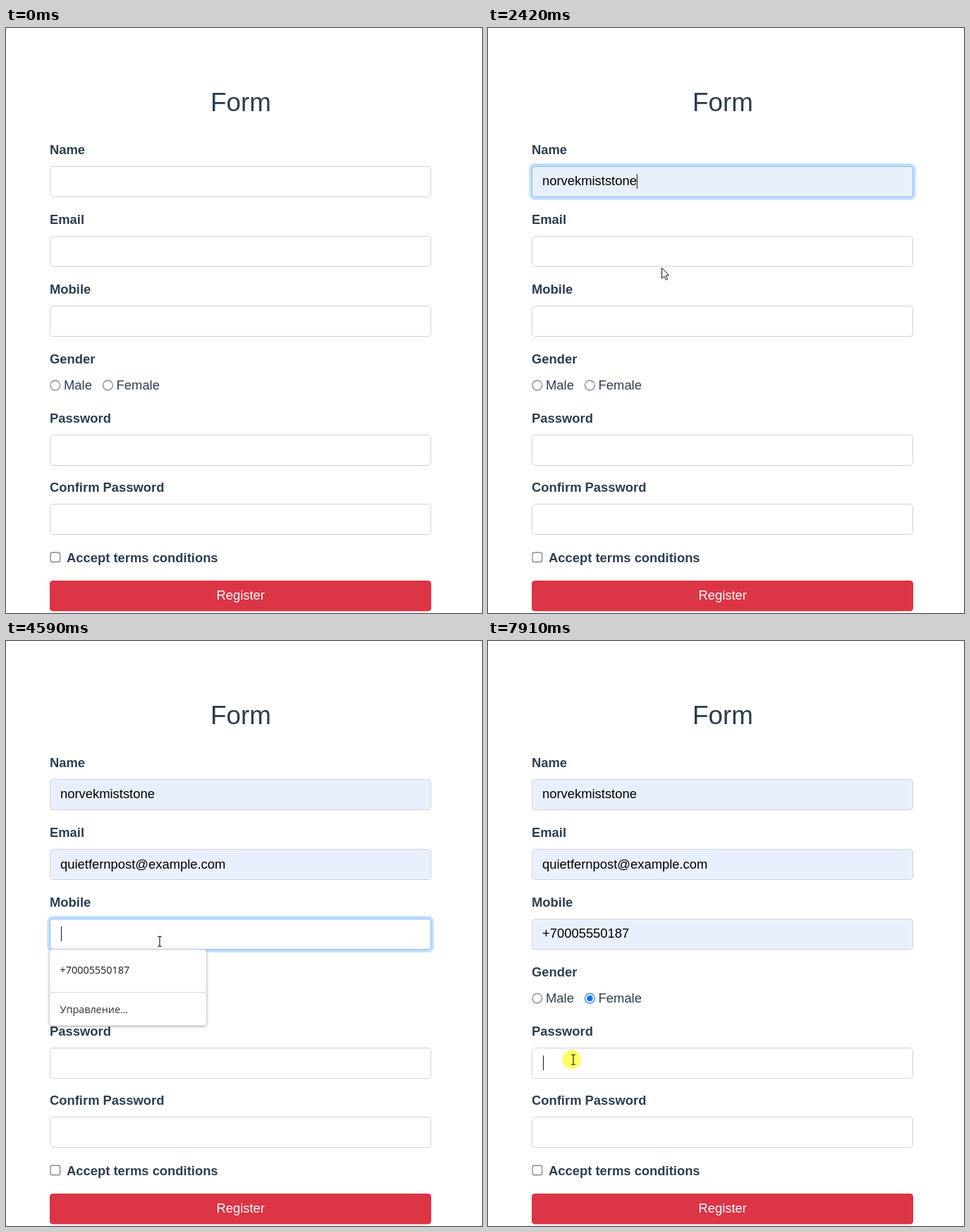
These frames come from a looping animation (675 by 830 pixels, 7990 ms). An HTML page:

```html
<!DOCTYPE html>
<html lang="en">
<head>
<meta charset="utf-8">
<title>Form</title>
<style>
  html, body { margin: 0; width: 100%; height: 100%; overflow: hidden; background: #fff; }
  svg { display: block; width: 675px; height: 830px; font: 18.4px "Liberation Sans", Arial, sans-serif; fill: #2c3e50; }
  .title { font-size: 36.8px; }
  .label { font-weight: 700; }
  .value { fill: #000; }
  .preview { fill: #000; font-size: 15.3px; }
  .item { fill: #1b1b1b; font: 500 14.4px "Open Sans", "Noto Sans", sans-serif; }
  .manage { fill: #333; font-weight: 400; }
  .menu { fill: #fff; filter: drop-shadow(0 1px 2px rgba(0, 0, 0, .4)); }
</style>
</head>
<body>
<svg id="stage" viewBox="0 0 675 830"></svg>
<script>
const LOOP = 7990, ROW = 41.35;
const USER = 'norvekmiststone', MAIL = 'quietfernpost@example.com', PHONE = '+70005550187';

// open/filled: menu opens / value is chosen; focus: [start, end] in ms
const fields = [
  { label: 'Name', y: 196, base: 223, focus: [1100, 2720], open: 1200, filled: 2190, value: USER,
    width: 222, height: 267, items: ['Ливея', USER, 'note', 'ghkk', 'id', 'alrowenmistystonefen'] },
  { label: 'Email', y: 295, base: 322.5, focus: [2720, 4120], open: 2870, filled: 3620, value: MAIL,
    width: 250, height: 267,
    items: [MAIL, MAIL, 'olvey416@example.com', 'Q' + MAIL.slice(1), '80005550142', '80005550187'] },
  { label: 'Mobile', y: 394, base: 421, focus: [4120, 5900], open: 4210, filled: 5060, value: PHONE,
    width: 222, height: 108, items: [PHONE], manage: true },
  { label: 'Password', y: 577, base: 604, focus: [7890, 9999] },
  { label: 'Confirm Password', y: 675, base: 702 }
];

// pointer path: time, x, y
const path = [
  [450, 646, 815], [650, 560, 640], [900, 380, 350], [1100, 268, 226], [1390, 262, 222],
  [1470, 258, 260], [1560, 257, 289], [1730, 257, 289], [1870, 249, 318], [2020, 247, 317],
  [2270, 247, 317], [2420, 246, 340], [2500, 246, 340], [2700, 245, 323], [2900, 242, 328],
  [3100, 240, 345], [3200, 240, 350], [3370, 240, 350], [3430, 224, 359], [3650, 224, 359],
  [3810, 222, 368], [3960, 222, 368], [4120, 218, 426], [4590, 218, 426], [4800, 212, 468],
  [5060, 210, 468], [5370, 197, 495], [5450, 150, 489], [5520, 97, 481], [5680, 72, 500],
  [5830, 74, 505], [6100, 95, 521], [6350, 116, 520], [6600, 118, 512], [6670, 98, 507],
  [6750, 77, 502], [6830, 68, 500], [7000, 68, 500], [7080, 95, 502], [7230, 150, 503],
  [7390, 150, 503], [7540, 140, 545], [7700, 124, 598], [7850, 121, 594], [LOOP, 121, 594]
];
const clicks = [[1100, 1220], [2020, 2190], [2720, 2850], [3580, 3680], [4120, 4240], [4980, 5080],
  [5830, 5950], [6820, 7040], [7200, 7420], [7870, LOOP]];

const clamp = v => Math.max(0, Math.min(1, v));
const within = (t, [a, b]) => t >= a && t < b;
const text = (x, y, s, cls = '') => `<text x="${x}" y="${y}" class="${cls}">${s}</text>`;

function pointerAt(t) {
  if (t < path[0][0]) return null;
  const i = path.findIndex(p => p[0] > t);
  const [t0, x0, y0] = path[i - 1], [t1, x1, y1] = path[i];
  const k = (t - t0) / (t1 - t0);
  return { x: x0 + (x1 - x0) * k, y: y0 + (y1 - y0) * k };
}

const isOpen = (f, t) => f.items && within(t, [f.open, f.filled]);

function hoveredRow(f, t, p) {
  if (!isOpen(f, t)) return -1;
  const row = Math.floor((p.y - f.y - 52.3) / ROW);
  return row < f.items.length ? row : -1;
}

function caretX(f) {
  const probe = document.getElementById('value' + fields.indexOf(f));
  return probe ? 77.5 + probe.getComputedTextLength() : 78.5;
}

function drawField(f, t, p) {
  const row = p ? hoveredRow(f, t, p) : -1;
  const filled = f.value && t >= f.filled;
  const [on, off] = f.focus || [1e5, 1e5];
  const glow = clamp((t - on - 90) / 150) * clamp(1 - (t - off) / 150);
  let out = text(62, f.y - 17, f.label, 'label');
  if (glow > 0) out += `<rect x="60.2" y="${f.y - 1.8}" width="544.6" height="47.6" rx="6" fill="none" stroke="#007bff" stroke-opacity="${glow * .25}" stroke-width="3.7"/>`;
  out += `<rect x="62.5" y="${f.y + .5}" width="540" height="43" rx="4.2" fill="${filled || row >= 0 ? '#e8f0fe' : '#fff'}" stroke="#ced4da"/>`;
  if (glow > 0) out += `<rect x="62.5" y="${f.y + .5}" width="540" height="43" rx="4.2" fill="none" stroke="#80bdff" stroke-opacity="${glow}"/>`;
  if (filled) out += `<text id="value${fields.indexOf(f)}" x="77" y="${f.base}" class="value">${f.value}</text>`;
  else if (row >= 0) out += text(77.5, f.base, f.items[row], 'preview');
  return out;
}

function drawCaret(f, t) {
  if (!f.focus || !within(t, f.focus)) return '';
  const since = t - (t >= f.filled ? f.filled : f.focus[0]);
  if (since > 850) return '';
  const x = t >= f.filled ? caretX(f) : 78.5;
  return `<path d="M${x} ${f.y + 11}v21" stroke="#222" stroke-width="1.1"/>`;
}

function drawMenu(f, t, p) {
  if (!isOpen(f, t)) return '';
  const top = f.y + 43.5, row = hoveredRow(f, t, p);
  let out = `<rect x="62" y="${top}" width="${f.width}" height="${f.height}" rx="4" class="menu"/>`;
  if (row >= 0) out += `<rect x="62" y="${top + 8.8 + row * ROW}" width="${f.width}" height="${ROW}" fill="#c8c8c8"/>`;
  f.items.forEach((s, i) => out += text(76.5, top + 34.3 + i * ROW, s, 'item'));
  if (f.manage) {
    out += `<path d="M62 ${top + 61}h${f.width}" stroke="#dcdcdc"/>` + text(76.5, top + 90, 'Управление…', 'item manage');
  }
  return out;
}

function radio(x, label, checked, hover) {
  const color = checked ? '#0075ff' : hover ? '#4f4f4f' : '#767676';
  return `<circle cx="${x}" cy="507" r="6.9" fill="#fff" stroke="${color}" stroke-width="1.15"/>` +
    (checked ? `<circle cx="${x}" cy="507" r="4.3" fill="${color}"/>` : '') + text(x + 12.2, 513, label);
}

function drawPointer(t, p) {
  if (!p) return '';
  const overMenu = fields.some(f => isOpen(f, t) && p.y > f.y + 43.5);
  const overField = fields.some(f => p.x > 62 && p.x < 603 && p.y > f.y && p.y < f.y + 43.5);
  const halo = clicks.some(c => within(t, c))
    ? `<circle cx="${p.x - 2.3}" cy="${p.y - .3}" r="13.4" fill="#ff0" fill-opacity=".6"/>` : '';
  const shape = overField && !overMenu
    ? '<path d="M-3-7h2.2l.8.8.8-.8h2.2M0-6.2V6.2M-3 7h2.2l.8-.8.8.8h2.2" fill="none" stroke="#111" stroke-width="1.1"/>'
    : '<path d="M.5.5v14.6l3.4-3.2 2.4 5.5 2.3-1-2.4-5.4h4.5z" fill="#fff" stroke="#111827"/>';
  return `${halo}<g transform="translate(${p.x} ${p.y})">${shape}</g>`;
}

const stage = document.getElementById('stage');

function render(t) {
  const p = pointerAt(t);
  const hover = (a, b) => p && p.y > 497 && p.y < 518 && p.x > a && p.x < b;
  const page = '<text x="333" y="118" text-anchor="middle" class="title">Form</text>' +
    fields.map(f => drawField(f, t, p)).join('') +
    text(62, 476, 'Gender', 'label') +
    radio(69.8, 'Male', within(t, [6950, 7400]), hover(62, 124)) +
    radio(144.4, 'Female', t >= 7400, hover(137, 219)) +
    '<rect x="63.1" y="744.1" width="13.6" height="13.6" rx="2.4" fill="#fff" stroke="#767676" stroke-width="1.15"/>' +
    text(86, 758, 'Accept terms conditions', 'label') +
    '<rect x="62" y="784" width="541" height="43.5" rx="4.6" fill="#dc3545"/>' +
    '<text x="332.7" y="811" text-anchor="middle" fill="#fff">Register</text>';
  stage.innerHTML = page;
  stage.insertAdjacentHTML('beforeend',
    fields.map(f => drawCaret(f, t) + drawMenu(f, t, p)).join('') + drawPointer(t, p));
}

const start = performance.now();
function tick() {
  render((performance.now() - start) % LOOP);
  requestAnimationFrame(tick);
}
tick();
</script>
</body>
</html>
```
